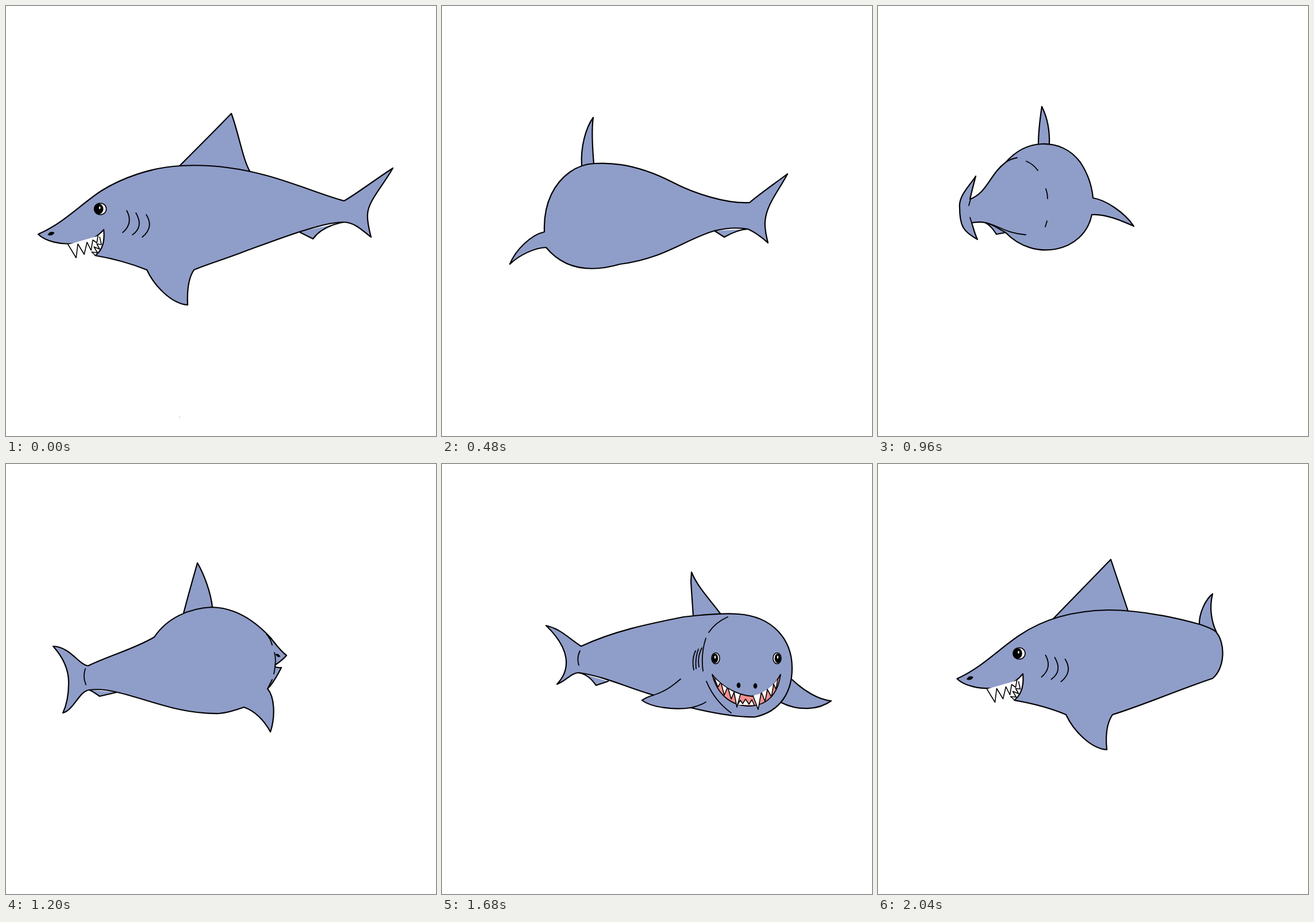
Recreate the animation shown at these times as an HTML page. Size 748 px wide and 748 px high, loop 2.16 s.

```html
<!DOCTYPE html>
<html lang="en">
<head>
<meta charset="utf-8">
<title>Circling shark</title>
<style>
  html, body { margin: 0; width: 100%; height: 100%; overflow: hidden; background: #fff; }
  #reel { display: block; width: 13464px; height: 748px; animation: reel 2160ms steps(18) infinite; }
  @keyframes reel { to { transform: translateX(-13464px); } }
  path { stroke: #000; stroke-width: 2.2; stroke-linejoin: round; stroke-linecap: round; }
  .skin { fill: #8f9dc9; }
  .line { fill: none; stroke-width: 1.8; }
  .white { fill: #fff; stroke-width: 1.6; }
  .pink { fill: #f2908f; stroke-width: 1.8; }
  .black { stroke-width: .6; }
  .shine { fill: #fff; stroke: none; }
  .speck { fill: #aaa; stroke: none; }
</style>
</head>
<body>
<svg id="reel" viewBox="0 0 13464 748"></svg>
<script>
// A drawing is a list of [class, path]; paths hold only absolute "x y" pairs.
const warp = (drawing, fn) => drawing.map(([cls, d]) =>
  [cls, d.replace(/(-?[\d.]+) (-?[\d.]+)/g, (_, x, y) => fn(+x, +y).map(n => n.toFixed(1)).join(' '))]);

const shift = (dx, dy) => (x, y) => [x + dx, y + dy];

// Blends the shared parts: pelvic fin, dorsal fin, body.
const blend = (a, b, k) => [0, 1, 2].map(i => {
  const to = b[i][1].match(/-?[\d.]+/g);
  let n = 0;
  return ['skin', a[i][1].replace(/-?[\d.]+/g, v => (+v + (to[n++] - v) * k).toFixed(1))];
});

const oval = (x, y, rx, ry) => {
  const p = rx * .552, q = ry * .552;
  return `M${x - rx} ${y}C${x - rx} ${y - q} ${x - p} ${y - ry} ${x} ${y - ry}` +
    ` ${x + p} ${y - ry} ${x + rx} ${y - q} ${x + rx} ${y}` +
    ` ${x + rx} ${y + q} ${x + p} ${y + ry} ${x} ${y + ry}` +
    ` ${x - p} ${y + ry} ${x - rx} ${y + q} ${x - rx} ${y}Z`;
};

const sideFace = [
  ['white', 'M108 415L122 438 125 414 136 432 141 411 148 425 151 407 158 412 160 400'],
  ['white', 'M156 434L149 428 159 429 153 419 163 423 158 414 166 415 163 402'],
  ['white', oval(164, 353, 10.5, 10)],
  ['black', oval(161.5, 353, 7.5, 9)],
  ['shine', oval(163, 351, 1.3, 2.5)],
  ['black', 'M73 398Q76 391 84 394 81 401 73 398Z'],
  ['line', 'M210 356Q222 378 203 394M226 360Q240 384 220 398M244 363Q258 385 237 402']
];

const side = [
  ['skin', 'M510 393L534 405C545 390 565 380 588 376'],
  ['skin', 'M302 278C330 250 365 215 392 187 405 222 412 268 425 289'],
  ['skin', 'M56 397C100 378 130 345 165 322 200 300 250 281 303 278 352 275 405 282 450 294 ' +
    '500 307 550 329 588 339 605 330 645 300 673 282 652 318 630 340 629 362 628 376 632 390 635 402 ' +
    '622 392 606 376 588 376 565 376 540 384 510 393 485 401 450 414 420 425 390 437 345 451 327 459 ' +
    '316 475 315 500 316 520 288 518 258 487 245 459 220 449 185 439 155 434 168 425 172 408 170 389 ' +
    '158 403 140 412 121 413 95 416 68 409 56 397Z']
];

const away = [
  ['skin', 'M474 391L491 402C505 394 517 389 532 388'],
  ['skin', 'M243 277C241 245 250 212 263 194 260 215 262 250 264 274'],
  ['skin', 'M178 385C178 365 182 345 190 328 206 295 235 275 265 274 310 271 355 283 400 306 ' +
    '440 327 495 344 535 342 548 330 580 308 601 292 588 318 564 345 562 375 561 388 564 400 567 412 ' +
    '556 402 546 394 532 388 515 385 495 386 474 391 425 405 385 440 310 449 262 463 215 461 181 420 ' +
    '160 421 135 433 118 449 128 424 155 398 178 393 178 393 178 392 178 391 178 391 178 391 178 390 ' +
    '178 390 178 389 178 388 178 387 178 386 178 385Z']
];

const rear = [
  ['skin', 'M228 393L206 397C201 389 196 382 187 377'],
  ['skin', 'M298 241C299 215 294 193 285 175 282 195 279 220 279 240'],
  ['skin', 'M374 334C372 312 364 290 352 272 336 250 312 239 285 240 258 241 238 254 222 272 ' +
    '195 292 190 325 160 336 163 322 167 308 170 296 160 312 140 330 142 350 142 385 150 393 173 406 ' +
    '168 396 166 386 163 377 170 376 180 375 187 377 199 379 210 388 222 394 270 445 358 430 372 363 ' +
    '395 361 425 374 445 383 428 358 395 337 374 334 374 334 374 334 374 334 374 334 374 334 374 334 ' +
    '374 334 374 334 374 334 374 334 374 334 374 334Z'],
  ['line', 'M242 264Q230 266 222 272M258 270Q270 275 278 286M292 318Q295 326 295 335M294 374L291 384'],
  ['line', 'M187 377C210 382 225 396 257 398M161 336L158 347M160 368L163 377']
];

const turning = [
  ['skin', 'M193 397L163 404C157 400 150 395 145 393'],
  ['skin', 'M359 249C356 223 345 193 333 172 325 200 316 232 309 259'],
  ['skin', 'M488 333C477 325 468 312 460 302 435 275 400 250 358 249 318 251 280 268 258 301 ' +
    '225 321 180 333 143 351 127 350 112 318 82 317 98 335 109 355 109 380 109 400 105 420 99 433 ' +
    '119 427 127 395 145 393 162 391 178 393 193 397 250 410 300 435 370 434 385 433 400 428 414 423 ' +
    '436 431 450 448 460 466 469 438 467 405 455 391 464 382 470 372 479 354 475 355 472 354 468 353 ' +
    '468 352 468 350 469 349 475 345 482 340 488 333Z'],
  ['line', 'M453 296Q460 303 463 315M467 328Q470 340 468 350M468 353L466 365M463 375L455 391'],
  ['line', 'M138 356Q133 370 139 384'],
  ['black', 'M469 331Q474 329 477 335 472 337 469 331Z']
];

const eye = (x, dx) => [
  ['white', oval(x, 338, 7, 9.5)],
  ['black', oval(x + dx, 338, 5, 8)],
  ['shine', oval(x + dx, 336, 1.2, 2.8)]
];

const front = [
  ['skin', 'M238 363C252 366 260 374 268 385L289 378'],
  ['skin', 'M437 264L433 205 434 188C445 215 468 238 484 260'],
  ['skin', 'M609 375C630 395 655 410 677 412 655 428 620 430 590 415'],
  ['skin', 'M242 317C300 290 360 278 420 266 455 262 490 259 515 261 575 265 609 305 609 355 ' +
    '609 395 590 430 545 440 510 441 470 433 433 424 405 428 365 424 348 411 355 406 361 404 368 402 ' +
    '325 390 285 370 238 363 225 363 215 378 200 383 224 358 224 322 181 281 207 287 220 303 242 317Z'],
  ['line', 'M368 402C390 395 402 385 415 374M433 424Q448 421 459 414M240 325Q234 337 238 350'],
  ['line', 'M497 266Q475 276 464 293M459 303Q450 330 454 360M460 378C468 398 480 416 503 433'],
  ['line', 'M441 325Q434 340 438 358M446 322Q440 338 442 356M452 320Q444 335 447 353'],
  ...eye(476, -1), ...eye(583, 1),
  ['black', oval(516, 385, 3, 4.5)],
  ['black', oval(545, 386, 3, 4.5)],
  ['pink', 'M470 366C485 385 510 402 540 404 565 402 578 385 589 366 585 395 570 420 535 421 500 421 478 398 470 366Z'],
  ['white', 'M514 419L519 411 523 417 528 409 534 418 539 410 543 419'],
  ['white', 'M474 373L480 388 484 381M486 383L491 402 496 390M498 391L503 409 508 397M508 397L513 423 519 401'],
  ['white', 'M541 403L550 427 555 399M556 398L562 413 566 392M566 392L573 405 577 383M577 383L581 392 584 374']
];

const tailBehind = [
  ['skin', 'M559 280C558 260 570 235 582 226 576 250 580 275 589 293'],
  ['skin', 'M304 270L405 166 435 256'],
  ['skin', 'M137.500 373.500C181 354 211 321 246 298 290 268 345 255 400 254 460 254 520 268 560 279 ' +
    '572 283 580 286 587 291 605 310 604 355 582 373 530 390 460 420 408 436 397 452 396 477 398 497 ' +
    '370 495 340 464 327 436 301 425 266 416 237 411 250 401 254 385 252 365 240 380 222 389 203 390 ' +
    '176 392 150 386 137.500 373.500Z'],
  ...warp(sideFace, shift(81.5, -23.5))
];

const tailOn = [
  ['skin', 'M192 340C160 345 135 370 122 405 145 385 170 372 196 370'],
  ['skin', 'M364 340C396 345 421 370 434 405 411 385 386 372 360 370'],
  ['skin', 'M268 258C268 228 272 205 275 182 284 205 288 230 287 258'],
  ['skin', oval(278, 345, 91, 93)],
  ['skin', 'M278 290C296 318 296 375 280 412 262 378 262 318 278 290Z']
];

const flip = (x, y) => [743.9 - x + .072 * y, y - 36 + .072 * x];
const sideRight = warp(side, flip);
const faceRight = warp(sideFace, flip);

const turnAway = k => [
  ...blend(side, away, k),
  ...(k > .6 ? [] : warp(sideFace, (x, y) => [170 + 8 * k + (x - 170) * (1 - k), y]))
];

// Foreshortens everything on one side of an upright axis.
const squeeze = (axis, k, dir) => (x, y) => [(x - axis) * dir > 0 ? axis + (x - axis) * k : x, y];

const frames = [
  [...side, ...sideFace, ['speck', oval(302, 715, 1, .8)]],
  turnAway(.25),
  turnAway(.5),
  turnAway(.75),
  away,
  warp(away, squeeze(300, .77, 1)),
  tailOn,
  warp(rear, squeeze(240, .6, -1)),
  rear,
  blend(rear, turning, .5),
  turning,
  [...blend(turning, sideRight, .5),
    ...warp(faceRight, (x, y) => [535 + (x - 602) * .55, y - 6 - (x - 602) * .09])],
  [...sideRight, ...faceRight],
  warp(front, (x, y) => [140 + (x - 181) * 1.05, y - 2]),
  front,
  warp(warp(front, squeeze(470, .45, -1)), shift(-90, -20)),
  warp(front, (x, y) => [720 - .85 * x, y - 10]),
  tailBehind
];

document.getElementById('reel').innerHTML = frames.map((drawing, i) =>
  `<g transform="translate(${i * 748})">` +
  drawing.map(([cls, d]) => `<path class="${cls}" d="${d}"/>`).join('') + '</g>').join('');
</script>
</body>
</html>
```
